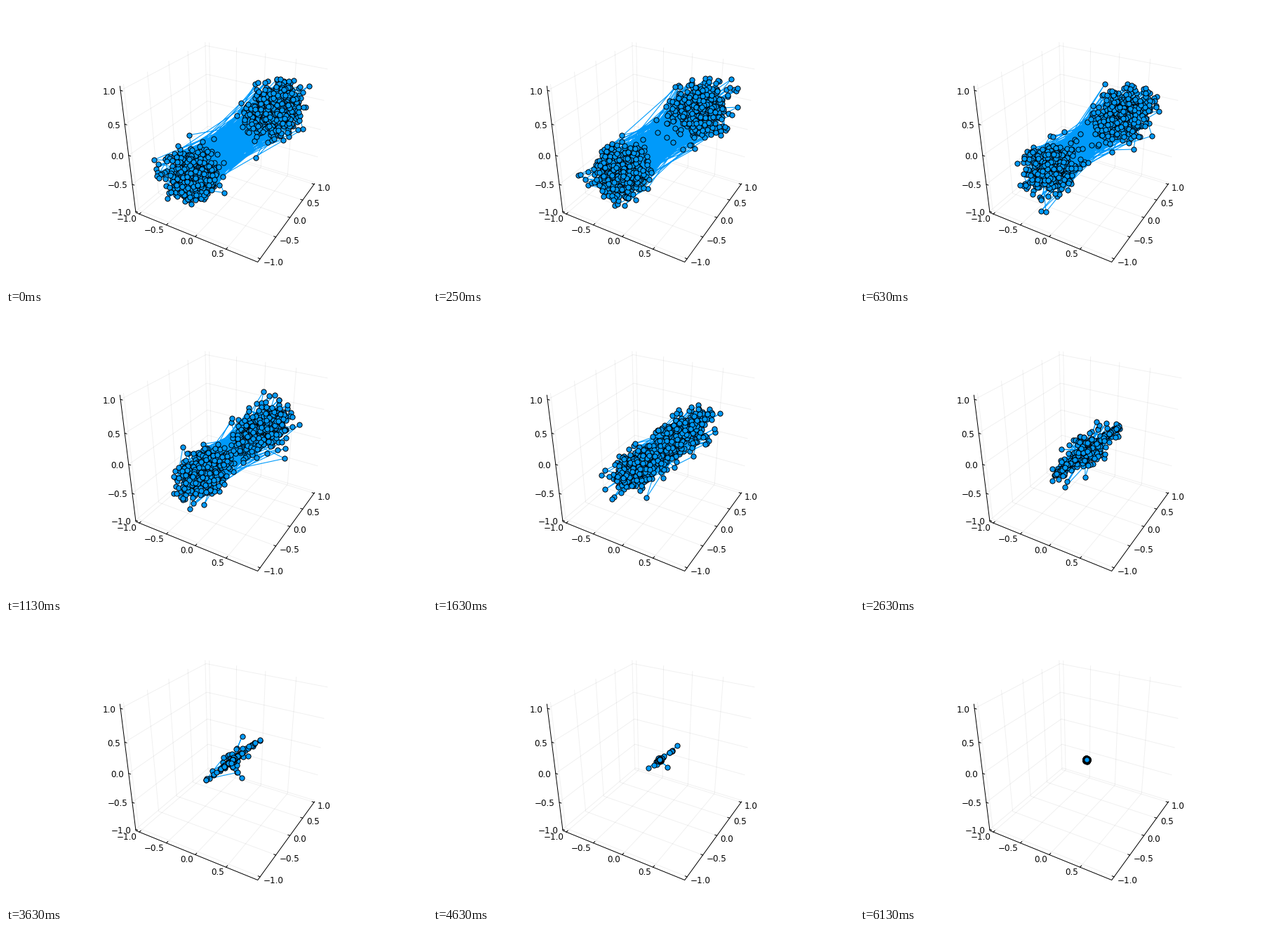
Write a matplotlib script that moves like this. It is 600 by 400 pixels and loops after 6.26 s.

```python
import numpy as np
import matplotlib.pyplot as plt
from matplotlib.animation import FuncAnimation

WIDTH, HEIGHT, DPI = 600, 400, 100
FRAMES, LOOP_MS = 50, 6260
POINTS = 850
BLUE = "#009afa"
PX = 72 / DPI  # one pixel in points

LOW = np.array([-1.065, -1.07, -1.025])
HIGH = np.array([0.98, 1.02, 1.06])
(X0, Y0, Z0), (X1, Y1, Z1) = LOW, HIGH
TICKS = (-1.0, -0.5, 0.0, 0.5, 1.0)

# Perspective camera looking at the centre of the box.
AZIMUTH, ELEVATION, VIEW_ANGLE = np.radians([30, 30, 30])
DISTANCE = np.sqrt(3) / np.sin(VIEW_ANGLE / 2)
CENTER, SCALE = np.array([318, 192]), 100


def project(points):
    """Data coordinates to screen pixels."""
    x, y, z = ((np.atleast_2d(points) - LOW) / (HIGH - LOW) * 2 - 1).T
    right = x * np.cos(AZIMUTH) + y * np.sin(AZIMUTH)
    back = y * np.cos(AZIMUTH) - x * np.sin(AZIMUTH)
    up = back * np.sin(ELEVATION) + z * np.cos(ELEVATION)
    depth = back * np.cos(ELEVATION) - z * np.sin(ELEVATION)
    zoom = SCALE * DISTANCE / (DISTANCE + depth)
    return CENTER + np.c_[right * zoom, -up * zoom]


fig = plt.figure(figsize=(WIDTH / DPI, HEIGHT / DPI), dpi=DPI, facecolor="white")
ax = fig.add_axes([0, 0, 1, 1])
ax.set_xlim(0, WIDTH)
ax.set_ylim(HEIGHT, 0)
ax.axis("off")


def polyline(points, **style):
    ax.plot(*project(points).T, **style)


def tick(point, inward, dx, dy, align):
    """Short inward mark with its value beside the axis."""
    value = next(v for v in point if v in TICKS)
    start, toward = project([point, np.add(point, inward)])
    end = start + 3 * (toward - start) / np.hypot(*(toward - start))
    ax.plot(*np.array([start, end]).T, color="black", lw=PX, zorder=2)
    ax.text(start[0] + dx, start[1] + dy, f"{value:.1f}".replace("-", "\u2212"),
            ha=align, va="center_baseline", family="DejaVu Sans", fontsize=12 * PX)


def draw_box():
    grid = dict(color="black", alpha=0.06, lw=PX, zorder=1)
    for t in TICKS:
        if t < X1:
            polyline([(t, Y0, Z0), (t, Y1, Z0), (t, Y1, Z1)], **grid)
            tick((t, Y0, Z0), (0, 0.1, 0), -3, 6, "right")
        polyline([(X1, t, Z0), (X0, t, Z0), (X0, t, Z1)], **grid)
        tick((X1, t, Z0), (-0.1, 0, 0), 5, 4, "left")
        polyline([(X0, Y0, t), (X0, Y1, t), (X1, Y1, t)], **grid)
        tick((X0, Y0, t), (0.1, 0, 0), -6.5, 0.5, "right")
    polyline([(X0, Y0, Z1), (X0, Y0, Z0), (X1, Y0, Z0), (X1, Y1, Z0)],
             color="black", lw=PX, zorder=2)


def cloud(frame):
    """Two opposite clusters that merge and collapse onto the origin."""
    rng = np.random.default_rng(100 + frame)
    t = frame / (FRAMES - 1)
    reach = (1 - t) ** 0.6
    power = 0.12 * np.exp(5 * t + 7 * t * t)
    center = rng.choice([-0.5, 0.5], (POINTS, 1)) * rng.random((POINTS, 1)) ** power
    spread = rng.triangular(-0.5, 0, 0.5, (POINTS, 3)) * rng.random((POINTS, 1)) ** power
    # Residual jitter settles along the path.
    settle = np.linspace(1, 0, POINTS)[:, None]
    jitter = rng.uniform(-0.02, 0.02, (POINTS, 3)) * settle
    return project(reach * (center + spread) + jitter)


draw_box()
path, = ax.plot([], [], "-o", color=BLUE, lw=1.1 * PX, ms=7.2 * PX,
                mec="black", mew=PX, zorder=3)


def update(frame):
    path.set_data(*cloud(frame).T)
    return path,


animation = FuncAnimation(fig, update, frames=FRAMES, interval=LOOP_MS / FRAMES,
                          repeat=True, repeat_delay=0)
plt.show()
```
